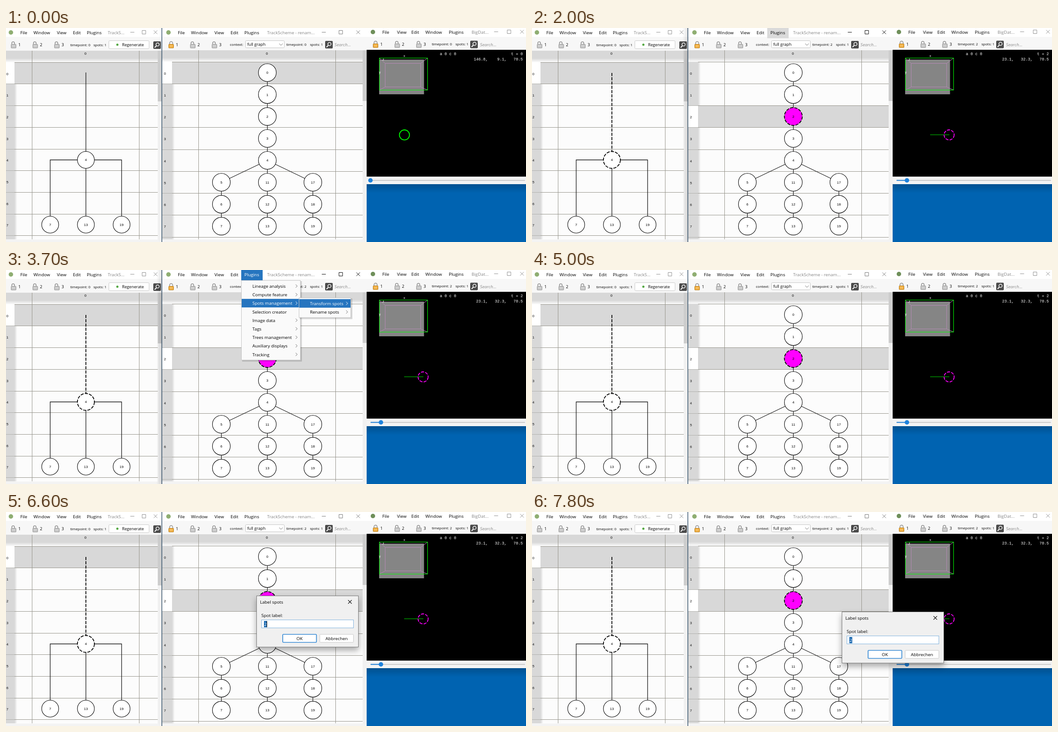
Animation, 1165 px wide and 481 px high, one loop 8 s. Source, as an HTML page:

```html
<!DOCTYPE html>
<html lang="en">
<head>
<meta charset="utf-8">
<title>Label spots</title>
<style>
html, body { margin: 0; width: 100%; height: 100%; overflow: hidden; background: #0063b1; }
svg { display: block; font-family: "Open Sans", "Noto Sans", sans-serif; font-size: 9.85px; }
text { white-space: pre; }
.small { font-size: 8px; }
.mid { font-size: 9.2px; }
.node { font: 8px "Liberation Sans", sans-serif; text-anchor: middle; }
.tiny { font: 7.5px "Liberation Sans", sans-serif; }
.mono { font: 8.73px "Liberation Mono", monospace; fill: #fff; }
.cut { animation: 8s step-end infinite; }
.dialog { animation: dialog 8s step-end infinite; }
@keyframes dialog {
  0% { opacity: 0; transform: translate(561px, 188px); }
  79.99% { opacity: .45; }
  81.24% { opacity: .85; }
  82.49% { opacity: 1; }
  83.74% { transform: translate(568px, 190px); }
  84.99% { transform: translate(594px, 197px); }
  86.24% { transform: translate(634px, 208px); }
  87.49% { transform: translate(669px, 217px); }
  88.74% { transform: translate(688px, 222px); }
  89.99% { opacity: 1; transform: translate(694px, 224px); }
  100% { opacity: 1; transform: translate(694px, 224px); }
}
</style>
</head>
<body>
<svg id="stage" width="1165" height="481" xmlns="http://www.w3.org/2000/svg"></svg>
<script>
const LOOP = 8000, GREY = '#d8d8d8', BLUE = '#2675bf', MAGENTA = '#ff00ff', DASH = '7 2.6';
const rules = new Map();

// Shows markup only between two times, with hard cuts.
function during(from, to, markup) {
  const name = `t${from}_${to}`;
  const pct = ms => Math.max(0, ms / LOOP * 100 - (ms < LOOP ? 0.01 : 0));
  rules.set(name, `@keyframes ${name}{0%{opacity:0}${pct(from)}%{opacity:1}${pct(to)}%{opacity:0}}`);
  return `<g class="cut" style="animation-name:${name}">${markup}</g>`;
}

const rect = (x, y, w, h, fill, more = '') =>
  `<rect x="${x}" y="${y}" width="${w}" height="${h}" fill="${fill}" ${more}/>`;
const path = (d, stroke = '#000', width = 1, more = '') =>
  `<path d="${d}" fill="none" stroke="${stroke}" stroke-width="${width}" ${more}/>`;
const circle = (x, y, r, fill, stroke = 'none', width = 1, dash = '') =>
  `<circle cx="${x}" cy="${y}" r="${r}" fill="${fill}" stroke="${stroke}" stroke-width="${width}" stroke-dasharray="${dash || 'none'}"/>`;
const text = (x, y, s, fill = '#000', more = '') =>
  `<text x="${x}" y="${y}" fill="${fill}" ${more}>${s}</text>`;
const small = (x, y, s) => text(x, y, s, '#000', 'class="small"');

const spot = (x, y, r, label, fill = '#fff', width = 1.1, dash = '') =>
  circle(x, y, r, fill, '#000', width, dash) + text(x, y + 2.9, label, '#000', 'class="node"');

function lock(x, y, n, closed) {
  const body = closed ? '#f0a830' : '#c2c2c2';
  const line = closed ? '#a9741c' : '#8c8c8c';
  const bow = closed ? `M${x - 3.5} ${y - 1}v-3a3.5 3.5 0 0 1 7 0v3` : `M${x - 4} ${y - 2}v-2a3 3 0 0 1 6 0v3`;
  return path(bow, '#8f8f8f', 1.5) +
    rect(x - 5.5, y - 1.5, 11, 8.5, body, `rx="1" stroke="${line}" stroke-width=".8"`) +
    rect(x - 3.5, y + 1, 7, 1, '#ffffff88') + rect(x - 3.5, y + 3.5, 7, 1, '#ffffff88') +
    text(x + 10.5, y + 3.3, n, '#000', 'class="mid"');
}

const buttons = (xs, y, color) => path(
  `M${xs[0] - 4.5} ${y}h9M${xs[1] - 4} ${y - 4}h8v8h-8z` +
  `M${xs[2] - 4} ${y - 4}l8 8m0-8l-8 8`, color, 1);

const searchIcon = (x, y) => rect(x, y, 17, 17, '#4b4b4b', 'rx="2"') +
  circle(x + 9.7, y + 7, 3.6, 'none', '#fff', 1.5) + path(`M${x + 7} ${y + 10}l-4 4`, '#fff', 2);

const TREE_MENU = [['File', 32], ['Window', 61.5], ['View', 114], ['Edit', 150], ['Plugins', 181]];
const VIEW_MENU = [['File', 32], ['View', 65], ['Edit', 97], ['Window', 128.5], ['Plugins', 181]];

// Title bar with menu, and the toolbar's locks; x is where the contents start.
function chrome(left, w, x, y, names, title, xTitle, logo, closed) {
  return rect(left, 0, w, 21, '#fff') + rect(left, 20, w, 32, '#f7f7f7') +
    circle(x + 11, y, 5, logo) +
    names.map(([s, dx]) => text(x + dx, y + 4, s)).join('') +
    text(xTitle, y + 4, title, '#858585') +
    [0, 1, 2].map(i => lock(x + 17 + i * 48.5, y + 28, i + 1, closed && !i)).join('');
}

// Grid behind a lineage tree.
function grid(x, head, w, top, step, side, cols, xLabel, xRow, current) {
  const right = x + w, line = '#95938a';
  const rowY = k => Math.floor(top + k * step);
  const row = k => rect(x, rowY(k), w, rowY(k + 1) - rowY(k), GREY) +
    rect(x, rowY(k), side, rowY(k + 1) - rowY(k), '#fff');
  let s = rect(x, head, w, 481 - head, '#fcfcfc') + rect(x, top, side, 475 - top, GREY);
  s += current.map(([k, a, b]) => during(a, b, row(k))).join('');
  s += rect(x + side, top, 6, 475 - top, 'url(#edgeX)');
  for (let k = 0; k < 9; k++) {
    const y = rowY(k) + 0.5;
    s += path(`M${x + side} ${y}H${right}`, line, 1);
    if (k) s += path(`M${x} ${y}h${side}`, '#b0b0ac', 1);
    if (k < 8) s += text(xRow, top + (k + 0.5) * step + 4, k, '#000', 'class="tiny"');
  }
  s += rect(x, head, w, 17, GREY) + rect(x, head + 17, w, Math.floor(top) - head - 17, 'url(#edgeY)');
  for (const c of cols) s += path(`M${c + 0.5} ${head}V475`, line, 1);
  return s + text(xLabel, 60, 0, '#000', 'class="node"') +
    rect(x, 475.5, w + 9, 6, '#f3f3f3') +
    rect(right, head, 9, 427, '#f1f1f1') + rect(right, head, 9, 114, '#cdcdcd');
}

function leftWindow() {
  const root = 'M179 100V277', ends = [99, 179, 259];
  return chrome(0, 349, 0, 10, TREE_MENU, 'TrackS...', 228, '#8fae72', false) +
    buttons([283, 309, 335], 9.5, '#8e8e8e') +
    small(144, 41, 'timepoint: 0') + small(196, 41, 'spots: 1') +
    rect(230.5, 28.5, 90, 18, '#fff', 'rx="2" stroke="#c9c9c9"') +
    circle(249.5, 37.5, 2.5, '#55a843') + text(260, 41, 'Regenerate', '#000', 'class="mid"') +
    searchIcon(330, 30) +
    grid(0, 51, 340, 77.2, 48.7, 19, [58, 298], 178, 1, [[0, 0, LOOP]]) +
    path('M99 423V296.5H259V423M179 296V423', '#111', 1.3) +
    during(0, 700, path(root, '#111', 1.3) + spot(179, 296.5, 19, 4)) +
    during(700, 1300, path(root, '#000', 2.6) + spot(179, 296.5, 23.5, 4, '#fff', 2.6)) +
    during(1300, LOOP, path('M179 101V277', '#000', 1.8, `stroke-dasharray="${DASH}"`) +
      spot(179, 296.5, 19, 4, '#fff', 1.8, DASH)) +
    ends.map((x, i) => spot(x, 442, 19, 7 + i * 6)).join('');
}

function midWindow() {
  const y = k => 100.3 + k * 49.3, cx = 585.5, xs = [482.5, cx, 687.5];
  const ctl = [712, 750, 789];
  const two = (fill, r, w, dash) => spot(cx, y(2), r, 2, fill, w, dash);
  let s = chrome(349, 459, 353, 10, TREE_MENU, 'TrackScheme - renam...', 585, '#8fae72', true) +
    during(0, 1000, buttons(ctl, 9.5, '#777')) +
    during(1000, 5000, buttons(ctl, 9.5, '#000')) +
    during(5000, LOOP, buttons(ctl, 9.5, '#777')) +
    small(501.5, 40, 'context:') +
    rect(536.5, 28.5, 87, 16, '#fff', 'rx="2" stroke="#c4c4c4"') +
    text(540.5, 40, 'full graph', '#000', 'class="mid"') + path('M612 35l4 4 4-4', '#777', 1) +
    during(0, 1100, small(628, 40, 'timepoint: 0')) +
    during(1100, LOOP, small(628, 40, 'timepoint: 2')) +
    small(681, 40, 'spots: 1') + searchIcon(715, 29) +
    text(736, 41, 'Search...', '#8a8a8a', 'font-style="italic"') +
    grid(350, 50, 449, 76.1, 49.25, 22, [431, 738], 584.5, 354, [[0, 0, 1100], [2, 1100, LOOP]]);
  s += path(`M${cx} ${y(0)}V${y(7)}M${xs[0]} ${y(7)}V${y(5)}L${cx} ${y(4)}L${xs[2]} ${y(5)}V${y(7)}`, '#000', 1.1);
  for (const k of [0, 1, 3, 4]) s += spot(cx, y(k), 20, k);
  xs.forEach((x, i) => {
    for (let k = 5; k < 8; k++) s += spot(x, y(k), 20, k + i * 6);
  });
  return s +
    during(0, 700, two('#fff', 20, 1.1)) +
    during(700, 1000, two('#fff', 24, 2.6)) +
    during(1000, 1200, two('#ff40ff', 24, 2.6)) +
    during(1200, 1300, two(MAGENTA, 24, 2.6)) +
    during(1300, LOOP, two(MAGENTA, 20, 1.8, DASH)) +
    rect(348.5, 0, 1.5, 481, '#36536c') +
    during(1000, 5000, rect(337, 0, 12, 481, 'url(#shade)'));
}

function viewWindow() {
  const right = (y, s) => text(1158, y, s, '#fff', 'class="mono" text-anchor="end"');
  const coords = (x, y) => right(72.7, `${x.toFixed(1).padStart(6)}, ${y.toFixed(1).padStart(6)},   70.5`);
  const axis = (x, y, s) => text(x, y, s, '#fff', 'class="tiny"');
  const knob = x => path(`M817 342.5H${x}`, '#1e82dc', 2) + circle(x, 342.5, 5, '#1e82dc');
  const ring = (w, dash) => circle(934.5, 240.3, 11.3, 'none', MAGENTA, w, dash);
  const trail = path('M892 240H935', '#00e000', 1);
  return rect(808, 351, 357, 130, '#0063b1') + rect(808, 351, 357, 20, 'url(#drop)') +
    chrome(808, 357, 811, 9, VIEW_MENU, 'BigDat...', 1043, '#6f8f5a', true) +
    buttons([1098, 1127, 1156], 8.5, '#8e8e8e') +
    during(0, 1100, small(954, 39, 'timepoint: 0')) +
    during(1100, LOOP, small(954, 39, 'timepoint: 2')) +
    small(1007, 39, 'spots: 1') + searchIcon(1040, 28.5) +
    text(1062, 40.5, 'Search...', '#8a8a8a', 'font-style="italic"') +
    rect(808, 49, 357, 285, '#000') +
    rect(836, 71, 100.5, 78, '#858585') +
    path('M849.5 79.5h79.5v53h-79.5zM836.5 67.5l13 12M944.5 67.5l-15.5 12M836.5 139.5l13-7M944.5 139.5l-15.5-7', '#b78ab7', 1) +
    path('M836.5 67.5h108v72h-108z', '#00ff00', 1.1) +
    axis(890.5, 65, 'x') + axis(843.5, 72.5, 'z') + axis(835.5, 102, 'y') +
    text(972, 60.5, 'a 0 c 0', '#fff', 'class="mono"') +
    during(0, 100, coords(146.8, 9.1)) +
    during(100, 200, coords(61.4, 25.2)) +
    during(200, LOOP, coords(23.1, 32.3)) +
    rect(808, 334, 357, 17, '#f4f4f4') +
    path('M817 342.5H1162', '#c6c6c6', 2, 'stroke-linecap="round"') +
    during(0, 1100, right(60.5, 't = 0') + circle(892.7, 240.3, 11.3, 'none', '#00ff00', 1.8) + knob(816.5)) +
    during(1100, LOOP, right(60.5, 't = 2') + trail + knob(840)) +
    during(1100, 1300, ring(3.4)) +
    during(1300, LOOP, ring(1.8, DASH));
}

// A label ending in ">" opens a submenu; hot lists [row, from, to].
function menu(x, y, w, labels, hot) {
  const H = 19.2, h = labels.length * H + 7;
  const row = (i, color, mark) => {
    const cy = y + 3.5 + (i + 0.5) * H, s = labels[i];
    return text(x + 25, cy + 3.8, s.replace('>', ''), color) +
      (s.endsWith('>') ? path(`M${x + w - 11} ${cy - 3.5}l3.5 3.5-3.5 3.5`, mark, 1) : '');
  };
  return rect(x + 2, y + 2, w + 1, h + 1, '#00000026') +
    rect(x + 0.5, y + 0.5, w - 1, h - 1, '#fafafa', 'stroke="#c3c3c3"') +
    labels.map((_, i) => row(i, '#000', '#666')).join('') +
    hot.map(([i, a, b]) =>
      during(a, b, rect(x + 1, y + 3.5 + i * H, w - 2, H, BLUE) + row(i, '#fff', '#fff'))).join('');
}

function menus() {
  const tab = (x, w, fill, s, xText, color) => rect(x, 0, w, 23, fill) + text(xText, 14, s, color);
  return during(1800, 2000, tab(495, 32, '#dadada', 'Edit', 503)) +
    during(2000, 2400, tab(527, 48, '#dadada', 'Plugins', 534)) +
    during(2400, 5000, tab(527, 48, BLUE, 'Plugins', 534, '#fff') +
      menu(527, 23, 133, ['Lineage analysis>', 'Compute feature>', 'Spots management>', 'Selection creator',
        'Image data>', 'Tags>', 'Trees management>', 'Auxiliary displays>', 'Tracking>'],
        [[0, 2800, 2900], [1, 2900, 3000], [2, 3000, 5000]])) +
    during(3100, 5000, menu(656, 62, 117, ['Transform spots>', 'Rename spots>'],
      [[0, 3700, 3800], [1, 3800, 5000]])) +
    during(4000, 5000, menu(770, 80.5, 227,
      ['Change branch labels', 'Label selected spots', 'Systematically label spots (extern-intern)'],
      [[0, 4300, 4400], [1, 4400, 5000]]));
}

function dialog() {
  const caret = rect(23, 57, 1, 14, '#000');
  const button = (x, s, stroke, w) => rect(x, 87, 75.5, 18, '#fff', `rx="1.5" stroke="${stroke}" stroke-width="${w}"`) +
    text(x + 37.7, 99.8, s, '#000', 'text-anchor="middle"');
  return `<g class="dialog">` +
    rect(0, 0, 229, 116, '#f0f0f0', 'style="filter:drop-shadow(0 7px 7px rgba(0,0,0,.33))"') +
    rect(0.5, 0.5, 228, 115, '#f0f0f0', 'stroke="#777"') +
    text(8, 18, 'Label spots') + path('M205.5 10l8 8m0-8l-8 8', '#111', 1.1) +
    text(11, 48.3, 'Spot label:') +
    rect(11.5, 54.5, 206, 18, '#fff', 'stroke="#7fb2de"') +
    rect(17, 57, 6.5, 14, '#1767b0') + text(17.4, 68, '2', '#fff') +
    during(6400, 6800, caret) + during(7300, 7800, caret) +
    button(59, 'OK', '#3388d4', 1.7) + button(142, 'Abbrechen', '#c6c6c6', 1) + '</g>';
}

const fade = (id, axis, a, b) => `<linearGradient id="${id}" ${axis}>` +
  `<stop stop-color="${a}"/><stop offset="1" stop-color="${b}"/></linearGradient>`;
const down = 'x2="0" y2="1"';
const defs = '<defs>' + fade('edgeX', '', '#d8d8d8', '#d8d8d800') +
  fade('edgeY', down, '#d8d8d8', '#fcfcfc') + fade('drop', down, '#00000030', '#00000000') +
  fade('shade', '', '#00000000', '#0000001c') + '</defs>';

const scene = defs + leftWindow() + midWindow() + viewWindow() + menus() + dialog();
const sheet = document.createElement('style');
sheet.textContent = [...rules.values()].join('\n');
document.head.append(sheet);
document.getElementById('stage').innerHTML = scene;
</script>
</body>
</html>
```
